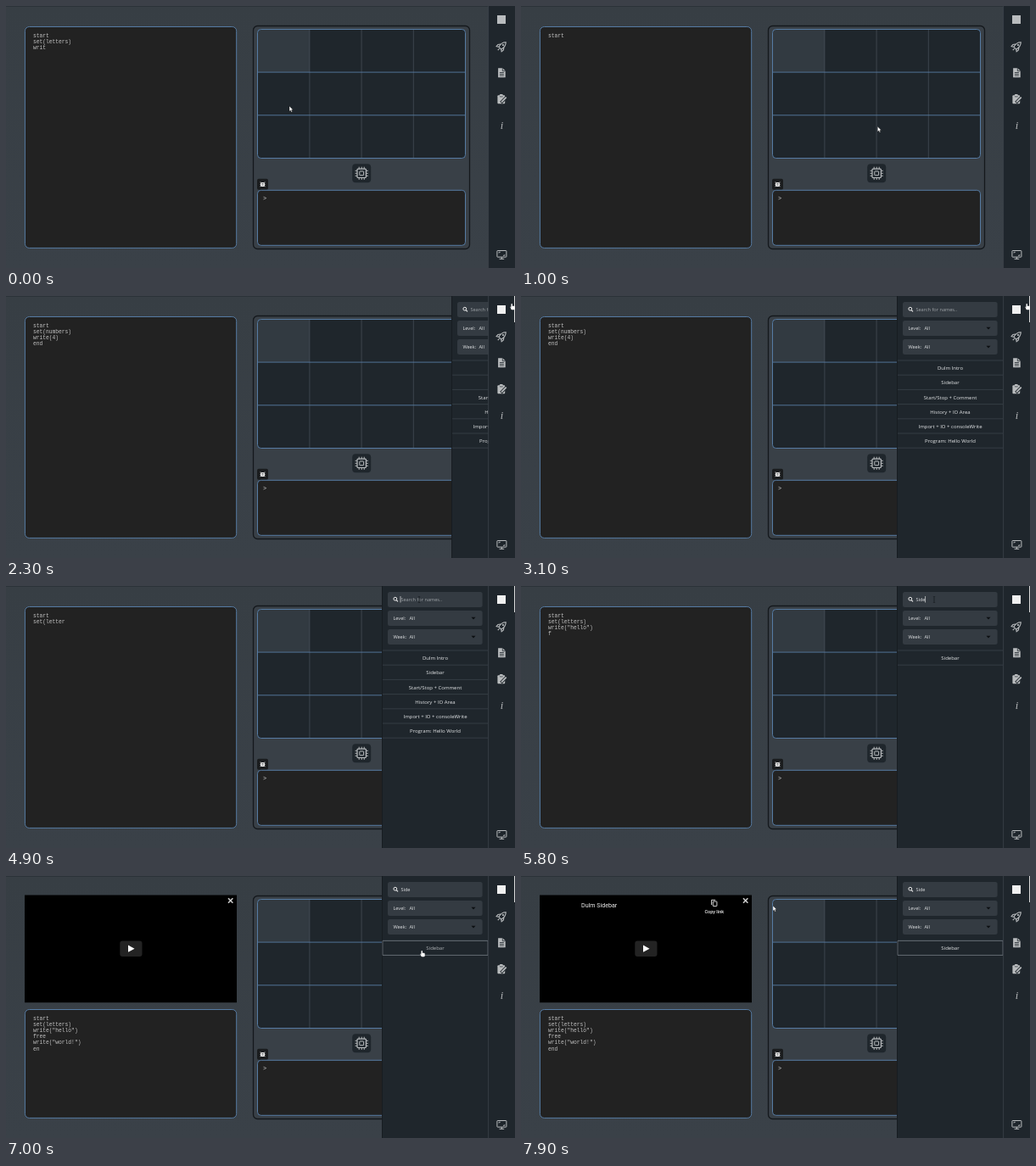
Animation, 600 px wide and 309 px high, one loop 8000 ms. Source, as an HTML page with a canvas:

```html
<!DOCTYPE html>
<html lang="en">
<head>
<meta charset="utf-8">
<title>Code editor with sidebar</title>
<style>
html, body { margin: 0; width: 100%; height: 100%; overflow: hidden; background: #393f46; }
canvas { display: block; width: 600px; height: 309px; }
</style>
</head>
<body>
<canvas id="stage"></canvas>
<script>
const W = 600, H = 309, LOOP = 8000;
const canvas = document.getElementById('stage');
const g = canvas.getContext('2d');
const dpr = window.devicePixelRatio || 1;
canvas.width = W * dpr;
canvas.height = H * dpr;

const MONO = '"Liberation Mono", monospace';
const SANS = '"Open Sans", "Noto Sans", sans-serif';
const ROBOTO = 'Roboto, sans-serif';
const DARK = '#1f262c', BLUE = '#567b a3'.replace(' ', ''), INK = '#222222', FIELD = '#343b42';
const RULE = '#39424a', ICON = '#b9bcbe', LIGHT = '#e0e2e4';

const LETTERS = 'start\nset(letters)\nwrite("hello")\nfree\nwrite("world!")\nend';
const NUMBERS = 'start\nset(numbers)\nwrite(4)\nend';
const ITEMS = ['Dulm Intro', 'Sidebar', 'Start/Stop + Comment', 'History + IO Area',
  'Import + IO + consoleWrite', 'Program: Hello World'];

const TYPE_MS = 48.5, BACK_MS = 29;
const OPEN = 2300, OPENED = 3100, PLAYER = 7000, TITLE = 7500;

// Stops of the pointer: time, x, y
const STOPS = [[0, 334, 118], [900, 404, 150], [1900, 567, 71], [2200, 596, 9], [3200, 596, 9],
  [4200, 500, 60], [4800, 487, 16], [6000, 487, 16], [6600, 490, 88], [PLAYER, 490, 88], [7900, 297, 35]];

function pointerAt(t) {
  const i = STOPS.findIndex(s => s[0] > t);
  if (i < 0) return STOPS[STOPS.length - 1].slice(1);
  const [t0, x0, y0] = STOPS[i - 1], [t1, x1, y1] = STOPS[i];
  const p = (t - t0) / (t1 - t0);
  return [x0 + (x1 - x0) * p, y0 + (y1 - y0) * p];
}

// Each program is typed, rests, and is erased backwards
function program(t) {
  const first = 'writ'.length + LETTERS.indexOf('writ');
  const cut = (s, n) => s.slice(0, Math.max(0, Math.round(n)));
  if (t < 770) return cut(LETTERS, first - t / BACK_MS);
  if (t < 3200) return cut(NUMBERS, (t - 770) / TYPE_MS);
  if (t < 4100) return cut(NUMBERS, NUMBERS.length - (t - 3200) / BACK_MS);
  // typing stalls while the player opens
  const clock = t > 6800 ? Math.max(6800, t - 150) : t;
  return cut(LETTERS, (clock - 4100) / TYPE_MS);
}

function box(x, y, w, h, r, fill, stroke, lw = 1) {
  g.beginPath();
  g.roundRect(x, y, w, h, r);
  if (fill) { g.fillStyle = fill; g.fill(); }
  if (stroke) { g.strokeStyle = stroke; g.lineWidth = lw; g.stroke(); }
}

function square(x, y, half, r, lw) {
  box(x - half, y - half, half * 2, half * 2, r, null, ICON, lw);
}

function line(color, lw, ...p) {
  g.beginPath();
  for (let i = 0; i < p.length; i += 2) g.lineTo(p[i], p[i + 1]);
  g.strokeStyle = color;
  g.lineWidth = lw;
  g.stroke();
}

function poly(color, ...p) {
  g.beginPath();
  for (let i = 0; i < p.length; i += 2) g.lineTo(p[i], p[i + 1]);
  g.closePath();
  g.fillStyle = color;
  g.fill();
}

function disc(x, y, r, fill, stroke) {
  g.beginPath();
  g.arc(x, y, r, 0, 7);
  if (fill) { g.fillStyle = fill; g.fill(); }
  if (stroke) { g.strokeStyle = stroke; g.lineWidth = 1; g.stroke(); }
}

function at(x, y, paint) {
  g.save();
  g.translate(x, y);
  paint();
  g.restore();
}

// y is the baseline
function text(s, x, y, font, color, align = 'left') {
  g.font = font;
  g.fillStyle = color;
  g.textAlign = align;
  g.fillText(s, x, y);
}

function chip() {
  box(-11, -11, 22, 22, 4, DARK);
  square(0, 0, 5.2, 1, 1.2);
  square(0, 0, 2.4, 0.5, 1);
  for (let side = 0; side < 4; side++) {
    for (const d of [-3, 0, 3]) line(ICON, 1, d, -7.6, d, -5.4);
    g.rotate(Math.PI / 2);
  }
}

function bug() {
  box(-6.5, -6.5, 13, 13, 2, '#1a1c1e');
  for (const d of [-2, 0, 2]) line('#eee', 0.8, -3, d * 1.2, 0, d * 0.6, 3, d * 1.2);
  disc(0, 0.2, 2.6, '#eee');
  for (const d of [-0.8, 0.8]) line('#1a1c1e', 0.6, -1, d, 1, d);
}

function machine() {
  box(291.5, 23.5, 255, 263, 5, '#394047', '#14181c', 1.3);
  box(296.5, 27.5, 245, 152, 4, DARK);
  box(297, 28, 61, 50, 0, '#323a41');
  for (let i = 1; i < 4; i++) line('#4b545c', 0.7, 296.7 + 61.2 * i, 28, 296.7 + 61.2 * i, 179);
  for (let i = 1; i < 3; i++) line(BLUE, 0.9, 297, 27.4 + 50.7 * i, 542, 27.4 + 50.7 * i);
  box(296.5, 27.5, 245, 152, 4, null, BLUE);
  at(419.2, 197.3, chip);
  at(302.5, 210.3, bug);
  box(296.5, 217.3, 245, 65, 4, INK, BLUE);
  text('>', 303, 229, '6.8px ' + MONO, '#d4d4d4');
}

function editor(t) {
  const drop = t >= PLAYER ? 133 : 0;
  box(22.4, 24.5 + drop, 249.3, 260.9 - drop, 5, INK, BLUE);
  program(t).split('\n').forEach((s, i) =>
    text(s, 32, 36.6 + drop + i * 7.18, '6.27px ' + MONO, '#c2c2c2'));
}

function player(t) {
  box(22, 22.4, 250, 126.8, 0, '#000');
  box(134.3, 76.4, 26.2, 18.6, 3, '#232323');
  poly('#fff', 144, 81.6, 144, 89.8, 151.5, 85.7);
  for (const s of [-2.7, 2.7]) line('#d0d0d0', 1.5, 264.7 - s, 26.3, 264.7 + s, 31.7);
  if (t < TITLE) return;
  text('Dulm Sidebar', 71, 37.4, '7.1px ' + ROBOTO, '#f2f2f2');
  line('#eee', 0.9, 224.6, 34, 224.6, 28.3, 229.2, 28.3);
  box(226.3, 30, 4.6, 5.6, 0.5, null, '#eee', 0.9);
  text('Copy link', 227.8, 44.2, '500 5.5px ' + ROBOTO, '#eee', 'center');
}

function field(y, label) {
  box(450, y, 111.6, 18, 2.5, FIELD);
  if (!label) return;
  text(label, 456.4, y + 11, '5.6px ' + SANS, LIGHT);
  text('All', 475.5, y + 11, '5.6px ' + SANS, LIGHT);
  poly('#0c0f12', 548.5, y + 7.8, 553.5, y + 7.8, 551, y + 10.6);
}

function search(t) {
  field(7);
  disc(458.8, 15.2, 1.9, null, '#f0f0f0');
  line('#f0f0f0', 1.2, 460.2, 16.6, 462, 18.4);
  const query = 'Side'.slice(0, Math.max(0, (t - 5150) / 150));
  text(query || 'Search for names..', 465.4, 18, '5.6px ' + SANS, query ? LIGHT : '#9ea3a7');
  if (t >= 4700 && t < 6400 && (t - 4700) % 1000 < 500) {
    const x = 465 + (query ? g.measureText(query).width + 0.5 : 0);
    line('#e0e0e0', 0.7, x, 12, x, 19.5);
  }
  return query.toLowerCase();
}

function panel(t, hover) {
  if (t < OPEN) return;
  g.save();
  g.beginPath();
  g.rect(443, 0, 126, H);
  g.clip();
  if (t < OPENED) g.translate(82, 0);
  box(443, 0, 126, H, 0, DARK);
  line('#171c21', 1, 443.5, 0, 443.5, H);
  const query = search(t);
  field(29, 'Level:');
  field(51, 'Week:');
  line(RULE, 0.8, 444, 76, 568, 76);
  ITEMS.filter(s => s.toLowerCase().includes(query)).forEach((s, i) => {
    const y = 76 + 17.2 * i;
    line(RULE, 0.8, 444, y + 17.2, 568, y + 17.2);
    text(s, 506, y + 11.1, '500 6px ' + SANS, hover ? '#b2b6b9' : '#e6e8ea', 'center');
  });
  if (hover || t >= PLAYER) box(444, 76.5, 124, 17, 0, null, '#626a71', 0.9);
  g.restore();
}

function rocket() {
  g.rotate(Math.PI / 4);
  g.beginPath();
  g.moveTo(-2, 3);
  g.bezierCurveTo(-3.4, -2, -2.4, -4.5, 0, -6.8);
  g.bezierCurveTo(2.4, -4.5, 3.4, -2, 2, 3);
  g.closePath();
  g.strokeStyle = ICON;
  g.lineWidth = 1.1;
  g.stroke();
  for (const s of [-1, 1]) line(ICON, 1.1, s * 2.7, -0.8, s * 4.6, 1.8, s * 4.3, 4.6, s * 2, 3);
  line(ICON, 1.1, 0, 4, 0, 6.6);
  disc(0, -2.2, 1.1, ICON);
}

function file() {
  poly(ICON, -4.3, -5.5, 1, -5.5, 4.3, -2.2, 4.3, 5.5, -4.3, 5.5);
  line(DARK, 0.8, 0.9, -5.5, 0.9, -2, 4.3, -2);
  for (const y of [-0.2, 1.6, 3.4]) line(DARK, 0.8, -2.5, y, 2.5, y);
}

function clipboard() {
  box(-5, -4.7, 8.8, 10, 1, ICON);
  box(-2.5, -6, 3.8, 2.4, 0.8, ICON);
  line(DARK, 0.7, -2.5, -3, 1.3, -3);
  line(DARK, 3.6, -0.9, 4, 5.7, -2.6);
  line(ICON, 1.8, -0.4, 3.5, 5.3, -2.2);
}

function monitor() {
  box(-5.5, -4.7, 11, 7.6, 0.6, null, ICON);
  line(ICON, 1.2, 0, 3, 0, 5);
  line(ICON, 1, -2.8, 5.1, 2.8, 5.1);
  for (const s of [-1, 1]) line(ICON, 0.9, s * 3.4, s * 0.8 - 0.9, s * 3.4, s * 2 - 0.9, s * 1.6, s * 2 - 0.9);
}

function sidebar(t) {
  box(569, 0, 31, H, 0, DARK);
  line('#394047', 0.9, 568.6, 0, 568.6, H);
  const active = t >= 2200;
  box(579, 11, 10, 10, 0, active ? '#f0f0f0' : ICON);
  if (active) box(599, 0, 1, 31, 0, '#d8d8d8');
  [rocket, file, clipboard].forEach((icon, i) => at(584.4, 47.5 + 31.2 * i, icon));
  text('i', 584.4, 145, 'italic 12.5px "Liberation Serif", serif', ICON, 'center');
  at(584.4, 293.2, monitor);
}

function arrow() {
  poly('#fff', 0, 0, 0, 6.2, 1.4, 5, 2.5, 7.2, 3.5, 6.7, 2.5, 4.6, 4.4, 4.5);
  g.strokeStyle = 'rgba(0,0,0,.65)';
  g.lineWidth = 0.5;
  g.stroke();
}

function hand() {
  box(-0.5, 0, 1.4, 5, 0.7, '#fff');
  box(-0.5, 2.8, 4.2, 4.4, 1.2, '#fff');
  poly('#fff', -2, 3.6, -0.5, 4.6, 0.6, 7.2, -0.4, 6.6);
}

function beam() {
  line('#14181c', 0.7, 0, -3.5, 0, 3.5);
  for (const y of [-3.5, 3.5]) line('#14181c', 0.5, -1.2, y, 1.2, y);
}

function draw(t) {
  g.setTransform(dpr, 0, 0, dpr, 0, 0);
  const bg = g.createLinearGradient(0, 0, 0, H);
  bg.addColorStop(0, '#373e44');
  bg.addColorStop(1, '#3a4148');
  g.fillStyle = bg;
  g.fillRect(0, 0, W, H);
  line('#2b3238', 1, 0, 0.5, 569, 0.5);

  const [x, y] = pointerAt(t);
  const onItem = t > 6000 && x > 443 && y >= 77;
  const onField = x > 450 && x < 561 && y > 7 && y < 25;
  editor(t);
  if (t >= PLAYER) player(t);
  machine();
  panel(t, onItem);
  sidebar(t);
  at(x, y, onItem || x > 570 ? hand : onField ? beam : arrow);
}

const begin = performance.now();
function tick() {
  const t = (performance.now() - begin) % LOOP;
  draw(Math.floor(t / 100) * 100);
  requestAnimationFrame(tick);
}
tick();
</script>
</body>
</html>
```
